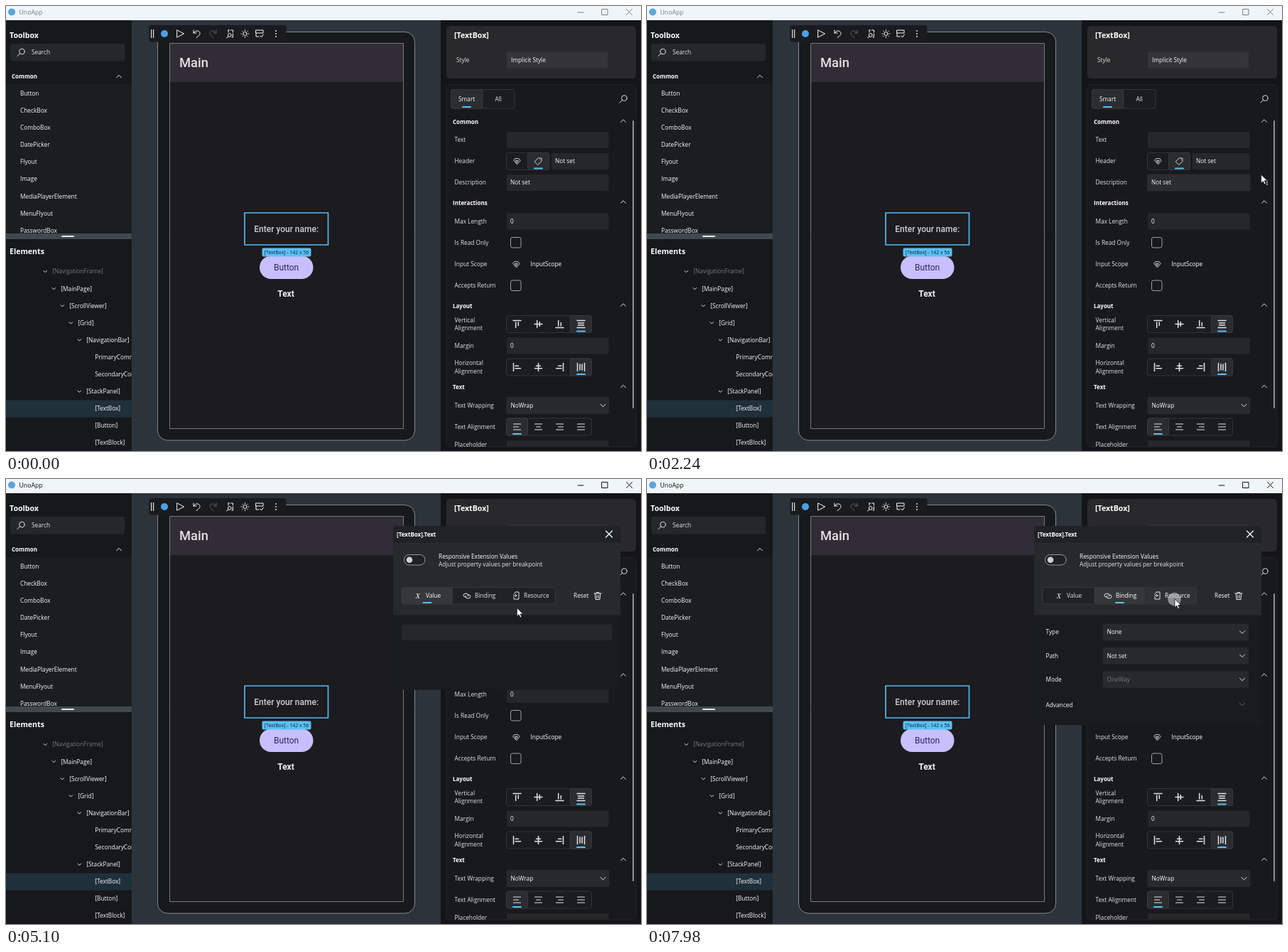
An HTML page with a canvas for the animation above (8000 ms loop, 894 by 626 pixels).

```html
<!DOCTYPE html>
<html lang="en">
<head>
<meta charset="utf-8">
<title>Visual designer</title>
<style>
  html, body { margin: 0; width: 100%; height: 100%; overflow: hidden; background: #151619; }
  canvas { display: block; width: 894px; height: 626px; }
</style>
</head>
<body>
<canvas id="stage" width="894" height="626"></canvas>
<script>
const ctx = document.getElementById('stage').getContext('2d');
const LOOP = 8000;
const WHITE = '#fafafa', LABEL = '#e4e4e4', DIM = '#77787a', ACCENT = '#5bc0f8';
const FIELD = '#25272a', LINE = '#323437';
const UI = '"Open Sans", sans-serif', APP = 'Roboto, sans-serif';

// ---- drawing helpers ----
function box(x, y, w, h, fill, radius = 0, stroke, lineWidth = 1) {
  ctx.beginPath();
  ctx.roundRect(x, y, w, h, radius);
  if (fill) { ctx.fillStyle = fill; ctx.fill(); }
  if (stroke) { ctx.strokeStyle = stroke; ctx.lineWidth = lineWidth; ctx.stroke(); }
}

function dot(x, y, r, fill) {
  ctx.beginPath();
  ctx.arc(x, y, r, 0, Math.PI * 2);
  ctx.fillStyle = fill;
  ctx.fill();
}

// y is the middle of the capital letters
function text(str, x, y, { color = LABEL, size = 8.3, weight = 500, family = UI, spacing = 0, align = 'left' } = {}) {
  ctx.font = `${weight} ${size}px ${family}`;
  ctx.letterSpacing = spacing + 'px';
  ctx.textAlign = align;
  ctx.fillStyle = color;
  ctx.fillText(str, x, Math.round(y + size * 0.36));
}
const bold = (str, x, y, size = 8) => text(str, x, y, { color: '#fff', size, weight: 700 });

function icon(x, y, path, { color = LABEL, width = 1, turn = 0, fill } = {}) {
  ctx.save();
  ctx.translate(x, y);
  ctx.rotate(turn);
  const shape = new Path2D(path);
  ctx.lineJoin = ctx.lineCap = 'round';
  ctx.strokeStyle = color;
  ctx.lineWidth = width;
  if (fill) { ctx.fillStyle = fill; ctx.fill(shape); }
  if (width) ctx.stroke(shape);
  ctx.restore();
}

const ICON = {
  search: 'M5.2 -1.4A3.8 3.8 0 1 1 -2.4 -1.4A3.8 3.8 0 1 1 5.2 -1.4M-1.4 1.3L-5 5',
  up: 'M-3.5 1.8L0 -1.7L3.5 1.8',
  down: 'M-3.5 -1.7L0 1.8L3.5 -1.7',
  treeDown: 'M-2.3 -1.1L0 1.2L2.3 -1.1',
  close: 'M-4.5 -4.5L4.5 4.5M4.5 -4.5L-4.5 4.5',
  play: 'M-4.5 -5L5 0L-4.5 5Z',
  undo: 'M-4.5 -5V-1H-.5M-4.5 -1C-2 -5 3 -5 4.3 -1.5C5.2 1.2 3 3 -.5 5.5',
  redo: 'M4.5 -5V-1H.5M4.5 -1C2 -5 -3 -5 -4.3 -1.5C-5.2 1.2 -3 3 .5 5.5',
  pick: 'M-2 -5H-.5M1.5 -5H4.5V-2M4.5 0V5H3M-2 -5V-2M2.2 2A2.4 2.4 0 1 1 -2.6 2A2.4 2.4 0 1 1 2.2 2M-2 4L-4.5 6',
  sun: 'M2.6 0A2.6 2.6 0 1 1 -2.6 0A2.6 2.6 0 1 1 2.6 0M0 -5.4V-4.4M0 4.4V5.4M-5.4 0H-4.4M4.4 0H5.4M-3.8 -3.8L-3.2 -3.2M3.2 3.2L3.8 3.8M-3.8 3.8L-3.2 3.2M3.2 -3.2L3.8 -3.8',
  list: 'M-5 -5H5V-1H-5ZM-5 -1V4H-1M1 3L2.5 5L5.5 1',
  gem: 'M-2.5 -3.8H2.5L4.6 -1L0 4.3L-4.6 -1ZM-1.8 -1H1.8L0 2Z',
  tag: 'M0 -4.5H4.5V0L-.8 5L-5 .8ZM2.4 -2.5V-2.3',
  alignStart: 'M-5.5 -5H5.5M-1.8 -2.5V5M1.8 -2.5V2',
  alignMiddle: 'M-5.5 0H5.5M-1.8 -5V5M1.8 -3V3',
  alignEnd: 'M-5.5 5H5.5M-1.8 2.5V-5M1.8 2.5V-2',
  alignFill: 'M-5.5 -5H5.5M-5.5 5H5.5M-4 -1.5H4M-4 1.5H4',
  textLeft: 'M-5 -4H5M-5 0H2M-5 4H5',
  textCenter: 'M-5 -4H5M-3 0H3M-5 4H5',
  textRight: 'M-5 -4H5M-2 0H5M-5 4H5',
  textFill: 'M-5 -4H5M-5 0H5M-5 4H5',
  chain: 'M-1 2H-2.5A2.4 2.4 0 0 1 -2.5 -2.8H.2A2.4 2.4 0 0 1 1.5 1M1 -1H2.5A2.4 2.4 0 0 1 2.5 3.8H-.2A2.4 2.4 0 0 1 -1.5 0',
  resource: 'M-1 -5H3.5V5H-3.5V2M-3.5 -2L-1 -5M-4 0H.5M-1.2 -1.7L.5 0L-1.2 1.7',
  trash: 'M-5 -3.5H5M-1.8 -3.5V-5H1.8V-3.5M-3.8 -3.5L-3 5H3L3.8 -3.5M-1.2 -1V3M1.2 -1V3',
  arrow: 'M0 0V11.8L2.7 9.2L4.7 13.5L6.7 12.6L4.8 8.5H8.6Z'
};

function moreDots(x, y, gap = 2.6, color = LABEL) {
  for (const i of [-1, 0, 1]) dot(x, y + i * gap, 0.9, color);
}

const underline = (x, y) => box(x - 6.5, y - 1, 13, 2, ACCENT, 1);

function field(x, y, w, str, hover) {
  const grow = hover ? 1 : 0;
  box(x - grow, y - 11.5 - grow / 2, w + 2 * grow, 23 + grow, hover ? '#2a2c2f' : FIELD, 2);
  if (str) text(str, x + 5, y, { color: WHITE });
}

function combo(x, y, w, str, color = WHITE) {
  box(x, y - 12, w, 24, '#27292c', 3);
  text(str, x + 6, y, { color });
  icon(x + w - 9, y, ICON.down);
}

function buttonGroup(y, names, selected, { turn = 0, width = 1.2 } = {}) {
  box(704.5, y - 12, names.length * 30, 24, '#1b1c1f', 3, LINE);
  box(704.5 + selected * 30, y - 12, 30, 24, '#2a2c2f', 3, '#37393c');
  names.forEach((name, i) => icon(719.5 + i * 30, y, ICON[name], { turn, width }));
  underline(719.5 + selected * 30, y + 10);
}

// ---- static areas ----
function titleBar(active) {
  box(0, 0, 894, 20, '#f0f5f9');
  dot(8, 8.5, 5, '#5aa5dc');
  const color = active ? '#111' : '#7d7f82';
  text('UnoApp', 18.5, 9, { color, size: 8.7, weight: 400 });
  icon(809, 9, 'M-4 0H4', { color });
  icon(843, 8.5, 'M-4 -4H4V4H-4Z', { color });
  icon(877.5, 8.5, 'M-4 -4L4 4M4 -4L-4 4', { color });
}

function toolbox() {
  box(0, 20, 177, 606, '#16181b');
  bold('Toolbox', 5, 41.5, 10.6);
  box(6, 53, 161, 24.5, '#25272a', 3);
  icon(21, 65.5, ICON.search);
  text('Search', 36, 65.5);
  box(0, 110, 177, 211, '#1b1d20');
  bold('Common', 8, 99);
  icon(159, 99, ICON.up);
  ['Button', 'CheckBox', 'ComboBox', 'DatePicker', 'Flyout', 'Image', 'MediaPlayerElement', 'MenuFlyout', 'PasswordBox']
    .forEach((name, i) => text(name, 20, 123 + i * 24.1, { color: WHITE }));
  box(0, 320, 177, 8, '#40494f');
  box(78, 323, 18, 2, '#e8e8e8', 1);
}

function elementTree() {
  const rows = [
    [0, '[NavigationFrame]', 1], [1, '[MainPage]', 1], [2, '[ScrollViewer]', 1], [3, '[Grid]', 1],
    [4, '[NavigationBar]', 1], [5, 'PrimaryCommands'], [5, 'SecondaryCommands'], [4, '[StackPanel]', 1],
    [5, '[TextBox]'], [5, '[Button]'], [5, '[TextBlock]']
  ];
  ctx.save();
  ctx.beginPath();
  ctx.rect(0, 328, 177, 298);
  ctx.clip();
  bold('Elements', 5, 345, 10.6);
  box(0, 554.5, 177, 24, '#20303b');
  rows.forEach(([depth, name, open], i) => {
    const y = 373.5 + i * 24.1, x = 65.3 + depth * 12;
    text(name, x, y, { color: i ? WHITE : DIM });
    if (open) icon(x - 10, y, ICON.treeDown);
  });
  ctx.restore();
}

function device() {
  box(177, 20, 435, 606, '#2d333b');
  box(213.5, 36.5, 362, 574.5, '#18191c', 14, '#85888c');
  box(230.5, 52.5, 329, 542, '#1c1b1f', 0, '#77797c');
  box(231, 53, 328, 54, '#302d37');
  text('Main', 244, 79.5, { color: '#e6e1e5', size: 18.4, family: APP });

  const app = { size: 12, weight: 500, family: APP, align: 'center' };
  text('Enter your name:', 394.7, 313.5, { ...app, color: '#d2cdd5' });
  box(336, 291, 117.5, 45, null, 0, '#55b9f0', 1.7);
  box(357, 351.5, 75.5, 32.5, '#c8bfff', 16.2);
  text('Button', 394.6, 367.5, { ...app, color: '#2f2278', weight: 400 });
  text('Text', 394, 404.5, { ...app, color: '#f4eff4', weight: 700 });
  box(360.5, 340.5, 69, 12, '#5bc0f8', 2);
  text('[TextBox] - 142 x 56', 395, 347, { color: '#10202a', size: 6.9, weight: 400, align: 'center' });
}

function toolbar() {
  box(201.5, 27, 193, 23.5, '#1a1b1e', 3);
  box(204, 33, 1.2, 12, LABEL);
  box(207, 33, 1.2, 12, LABEL);
  dot(223, 39, 5, '#4f9fe6');
  [['play', 245.5], ['undo', 268.5], ['redo', 291.5, '#5c5e61'], ['pick', 315], ['sun', 336.5], ['list', 357]]
    .forEach(([name, x, color]) => icon(x, 39, ICON[name], { color: color || WHITE }));
  moreDots(380, 39, 4, WHITE);
}

// Each row: middle y, label lines, and a painter that gets the hover flag
const alignNames = ['alignStart', 'alignMiddle', 'alignEnd', 'alignFill'];
const rows = [
  [188.5, ['Text'], h => field(705, 188.5, 143.5, '', h)],
  [218.5, ['Header'], h => {
    buttonGroup(218.5, ['gem', 'tag'], 1, { width: 0.9 });
    field(768, 218.5, 80.5, 'Not set', h);
  }],
  [248.5, ['Description'], h => field(705, 248.5, 143.5, 'Not set', h)],
  [303, ['Max Length'], h => field(705, 303, 143.5, '0', h)],
  [333, ['Is Read Only'], () => box(710.5, 325.5, 14.5, 14.5, null, 2.5, '#a0a1a3')],
  [363.5, ['Input Scope'], () => {
    icon(718.5, 363.5, ICON.gem, { width: 0.9 });
    text('InputScope', 738.5, 363.5, { color: '#fff' });
  }],
  [393.5, ['Accepts Return'], () => box(710.5, 386, 14.5, 14.5, null, 2.5, '#a0a1a3')],
  [447.5, ['Vertical', 'Alignment'], () => buttonGroup(447.5, alignNames, 3, { width: 1.5 })],
  [478, ['Margin'], h => field(705, 478, 143.5, '0', h)],
  [508, ['Horizontal', 'Alignment'], () => buttonGroup(508, alignNames, 3, { turn: -Math.PI / 2, width: 1.5 })],
  [562, ['Text Wrapping'], () => combo(704.5, 562, 145, 'NoWrap', '#fff')],
  [592, ['Text Alignment'], () => buttonGroup(592, ['textLeft', 'textCenter', 'textRight', 'textFill'], 0)],
  [622.5, ['Placeholder', 'Text'], h => field(705, 622.5, 143.5, '', h)]
];

function properties(pointer, hoverOn, pressed) {
  box(612, 20, 282, 606, '#141518');
  box(620, 28, 267, 74, '#29292b', 5);
  bold('[TextBox]', 631, 41.5, 10.6);
  text('Style', 634, 76);
  box(705, 64.5, 142, 23, '#343538', 2);
  text('Implicit Style', 711, 76, { color: WHITE });

  box(620, 110.5, 267, 509.5, '#18191c', 5, '#232528');
  ctx.save();
  ctx.beginPath();
  ctx.rect(620, 110, 267, 510);
  ctx.clip();
  box(626.5, 117.5, 89.5, 26.5, '#1b1c1f', 3, LINE);
  box(626.5, 117.5, 44.5, 26.5, '#2b2d30', 3, '#37393c');
  text('Smart', 637, 131, { color: '#fff' });
  text('All', 688.5, 131);
  underline(648.5, 142);
  icon(869, 131, ICON.search);

  for (const [name, y] of [['Common', 163], ['Interactions', 277], ['Layout', 422], ['Text', 536.5]]) {
    bold(name, 629, y);
    icon(869, y - 1.5, ICON.up);
  }
  for (const [y, lines, paint] of rows) {
    const hover = hoverOn && Math.abs(pointer.y - y) < 15;
    lines.forEach((line, i) => text(line, 631.5, y + (lines.length > 1 ? -5.5 + i * 11.5 : 0)));
    paint(hover);
    if (hover) {
      if (pressed) box(865, y - 8, 16, 16, '#2d2f32', 3);
      moreDots(873, y);
    }
  }
  ctx.restore();
  box(882, 161, 2, 405, '#8d8f92', 1);
}

// ---- popup ----
function popup(binding, pointer) {
  box(545, 66, 320, binding ? 280 : 230.5, '#1a1b1e', 4);
  box(545, 66, 320, 125.5, '#27292c', [4, 4, 0, 0]);
  box(545, 66, 320, 25, '#202225', [4, 4, 0, 0]);
  box(545, 90.5, 320, 1, '#303235');
  bold('[TextBox].Text', 550, 78.5);
  icon(849, 77.5, ICON.close, { color: '#fff', width: 1.2 });

  box(560.5, 106.5, 29.5, 14.5, '#1e2023', 7.3, '#97989a');
  dot(568, 113.8, 4.3, '#d0d1d2');
  text('Responsive Extension Values', 609, 108.8, { color: '#fff' });
  text('Adjust property values per breakpoint', 609, 120, { weight: 400 });

  box(557, 152.5, 216.5, 23.5, '#1f2124', 3, '#37393c');
  const overTabs = pointer.y > 152 && pointer.y < 176;
  ['Value', 'Binding', 'Resource'].forEach((name, i) => {
    const left = 557 + i * 72.2;
    const selected = i === (binding ? 1 : 0);
    const hover = overTabs && pointer.x >= left && pointer.x < left + 72.2;
    if (selected || hover) box(left, 152.5, 72.2, 23.5, selected ? '#35383b' : '#2f3235', 3);
    text(name, [591, 660, 729][i], 164.5, { color: selected || hover ? '#fff' : LABEL });
    if (selected) underline([593, 665.5][i], 174);
  });
  text('X', 576.5, 164, { color: WHITE, size: 10.5, weight: 'italic 400', family: '"Liberation Serif", serif' });
  icon(649, 164, ICON.chain);
  icon(718.5, 164, ICON.resource);
  text('Reset', 799, 164.5, { color: WHITE });
  icon(833, 164.5, ICON.trash);

  if (!binding) {
    box(557, 204.5, 296, 22.5, FIELD, 2);
    return;
  }
  [['Type', 'None', '#fff'], ['Path', 'Not set', WHITE], ['Mode', 'OneWay', DIM]].forEach(([label, value, color], i) => {
    const y = 215.5 + i * 33.2;
    text(label, 561.5, y, { color: WHITE });
    combo(641.5, y, 205.5, value, color);
  });
  text('Advanced', 561.5, 318, { color: WHITE });
  icon(838, 317, ICON.down, { color: '#6a6c6f' });
}

// ---- pointer ----
const linear = u => u;
const easeOut = u => 1 - (1 - u) ** 2;
const easeInOut = u => u < 0.5 ? 2 * u * u : 1 - 2 * (1 - u) ** 2;
const moves = [ // start, end, x, y, easing
  [510, 1300, 871.3, 439, easeOut],
  [1310, 2110, 864.3, 239.5, easeInOut],
  [2120, 2910, 870.5, 193.5, easeInOut],
  [4450, 5100, 719.5, 181.5, linear],
  [5100, 5260, 687.5, 175.5, linear],
  [5260, 5620, 674.5, 167.5, easeOut],
  [6810, 7570, 743, 169, easeInOut]
];

function pointerAt(time) {
  let x = 873, y = 628;
  for (const [start, end, toX, toY, ease] of moves) {
    if (time <= start) break;
    const k = ease(Math.min(1, (time - start) / (end - start)));
    x += (toX - x) * k;
    y += (toY - y) * k;
  }
  return { x, y };
}

const clicks = [[3380, 3620], [6030, 6140], [7980, 8000]];

function draw(time) {
  const pointer = pointerAt(time);
  const popupOpen = time >= 3750;
  ctx.clearRect(0, 0, 894, 626);
  toolbox();
  elementTree();
  device();
  toolbar();
  properties(pointer, time >= 510 && !popupOpen, time >= 3380);
  titleBar(time >= 3380);
  if (popupOpen) popup(time >= 6080, pointer);
  if (clicks.some(([from, to]) => time >= from && time < to)) {
    dot(pointer.x - 0.5, pointer.y, 9.3, 'rgba(190,190,190,.65)');
  }
  if (time >= 510) icon(pointer.x, pointer.y, ICON.arrow, { color: '#111', width: 0.8, fill: '#fff' });
}

function frame() {
  draw(performance.now() % LOOP);
  requestAnimationFrame(frame);
}
frame();
</script>
</body>
</html>
```
